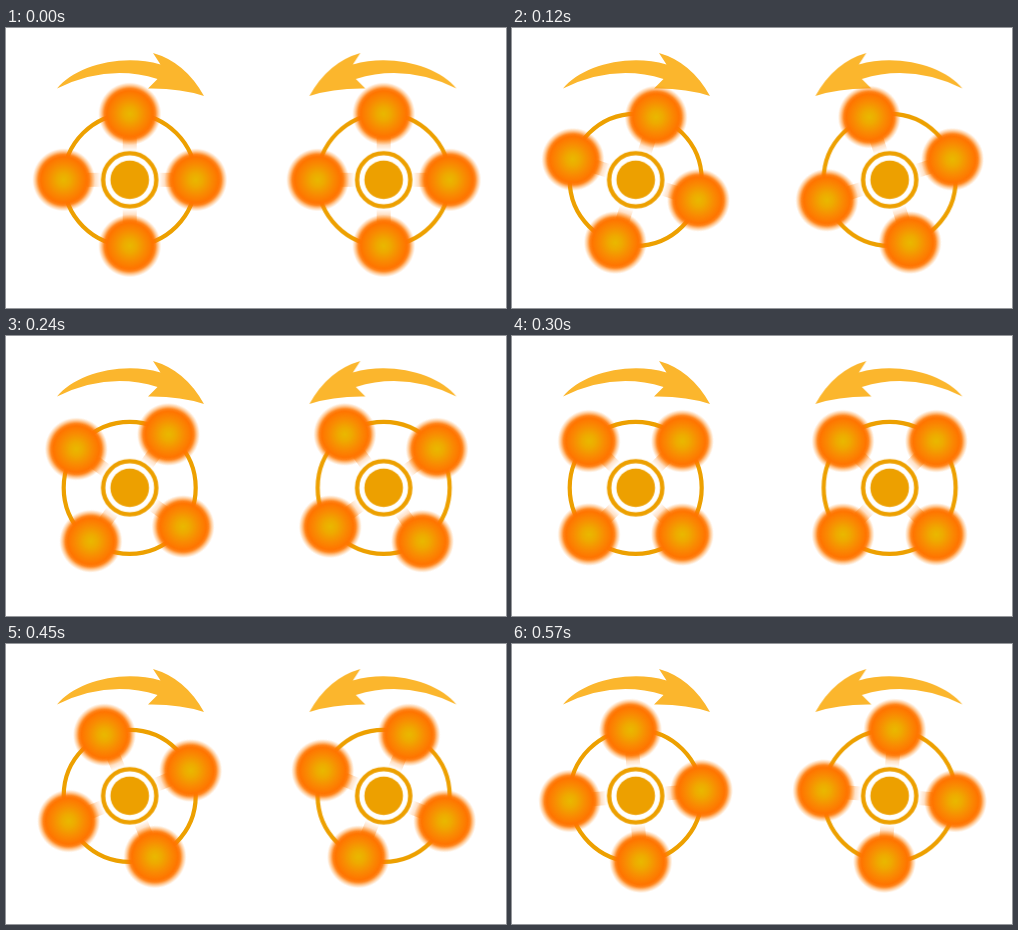
These frames come from a looping animation (500 px wide and 280 px high, 600 ms). An HTML page:

```html
<!DOCTYPE html>
<html lang="en">
<head>
<meta charset="utf-8">
<title>Counter-rotating wheels</title>
<style>
  html, body { margin: 0; width: 100%; height: 100%; overflow: hidden; background: #fff; }
  svg { display: block; width: 500px; height: 280px; }
  .line { fill: none; stroke: #eda000; }
  .rotor { animation: turn 600ms steps(20) infinite; transform-origin: 0 0; }
  /* four equal balls, so a quarter turn closes the loop */
  @keyframes turn { to { transform: rotate(90deg); } }
</style>
</head>
<body>
<svg id="stage" viewBox="0 0 500 280">
  <defs>
    <radialGradient id="glow">
      <stop offset="0" stop-color="#e9b800"/>
      <stop offset=".2" stop-color="#eeaa00"/>
      <stop offset=".48" stop-color="#f98a02"/>
      <stop offset=".7" stop-color="#ff7400"/>
      <stop offset=".77" stop-color="#ff7600" stop-opacity=".9"/>
      <stop offset=".86" stop-color="#ff7c00" stop-opacity=".4"/>
      <stop offset=".95" stop-color="#ff8000" stop-opacity="0"/>
    </radialGradient>
    <linearGradient id="fade" x1="0" y1="0" x2="0" y2="1">
      <stop offset="0" stop-color="#ff7800" stop-opacity=".55"/>
      <stop offset="1" stop-color="#ff7800" stop-opacity="0"/>
    </linearGradient>
    <g id="ball">
      <rect x="-7" y="-43" width="14" height="14" fill="url(#fade)"/>
      <circle cy="-66" r="33" fill="url(#glow)"/>
    </g>
  </defs>
  <g id="wheel">
    <path fill="#fbb62d" d="M51 60.5C69 38 116 25 154.5 36.5L147 25Q179 34 198 68Q174 60 142 60.5L151.5 51Q102 35.5 51 60.5Z"/>
    <g transform="translate(123.7 151.8)">
      <circle class="line" r="66" stroke-width="4.2"/>
      <g class="rotor">
        <use href="#ball"/>
        <use href="#ball" transform="rotate(90)"/>
        <use href="#ball" transform="rotate(180)"/>
        <use href="#ball" transform="rotate(270)"/>
      </g>
      <circle class="line" r="26.6" stroke-width="4.4"/>
      <circle r="19.3" fill="#eda000"/>
    </g>
  </g>
</svg>
<script>
  const twin = document.getElementById("wheel").cloneNode(true);
  twin.id = "twin";
  twin.setAttribute("transform", "translate(501.4 0) scale(-1 1)");
  document.getElementById("stage").append(twin);
</script>
</body>
</html>
```
